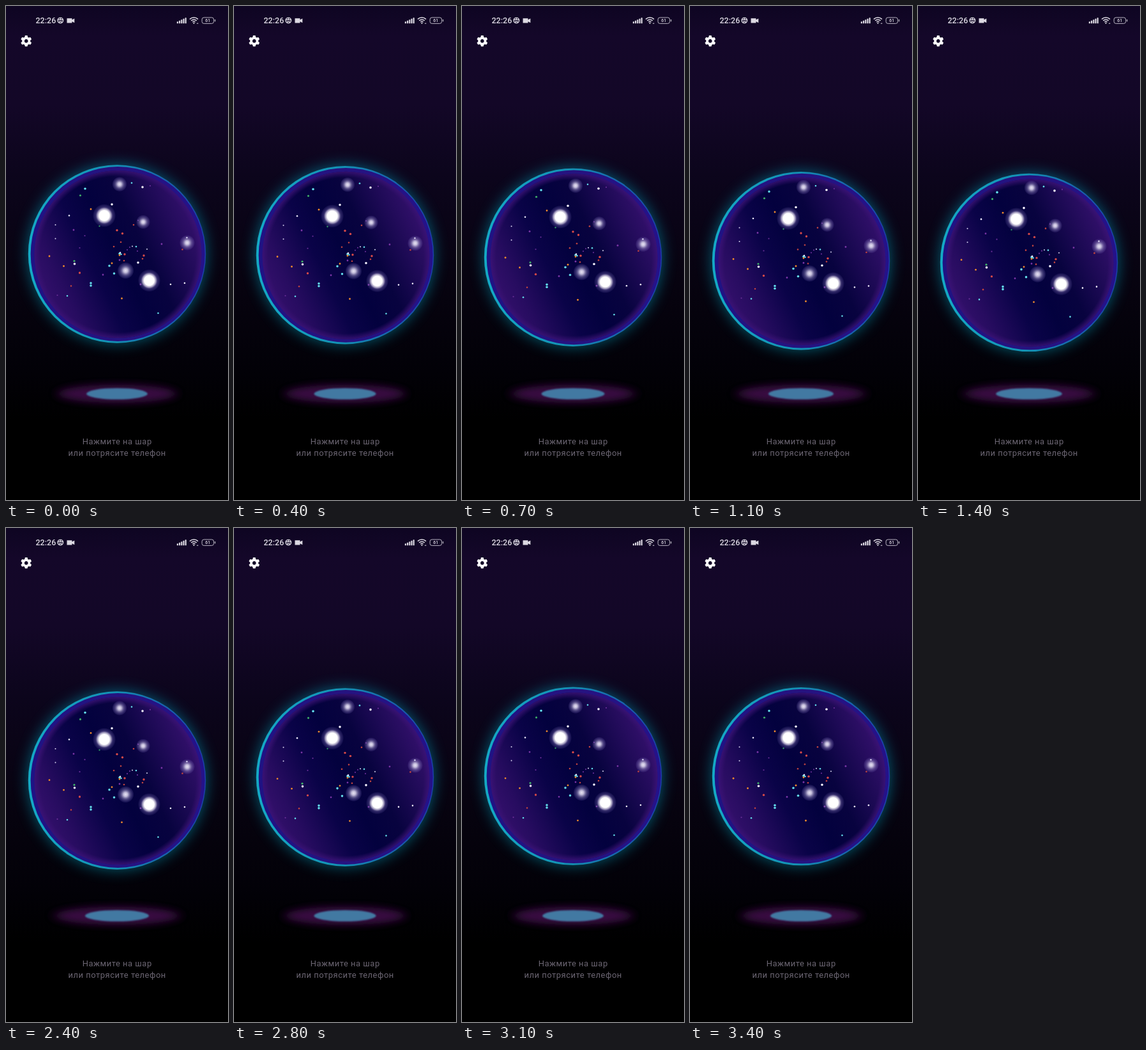
Write an HTML page that moves like this. It is 348 px wide and 772 px high and loops after 3500 ms.

```html
<!DOCTYPE html>
<html lang="ru">
<head>
<meta charset="utf-8">
<title>Шар</title>
<style>
  html, body { margin: 0; width: 100%; height: 100%; overflow: hidden; background: #000; }
  svg { display: block; width: 100%; height: 100%; }
  text { font-family: Roboto, "Noto Sans", sans-serif; }
  .hint { font-size: 13px; letter-spacing: .5px; fill: #6c6673; text-anchor: middle; }
  .clock { font-size: 12.5px; font-weight: 500; fill: #dcd9e2; }
  .charge { font-size: 7px; font-weight: 500; fill: #dcd9e2; text-anchor: middle; }
</style>
</head>
<body>
<svg viewBox="0 0 348 772">
  <defs>
    <linearGradient id="sky" x2="0" y2="1">
      <stop offset="0" stop-color="#0e0522"/>
      <stop offset=".06" stop-color="#140729"/>
      <stop offset=".2" stop-color="#130727"/>
      <stop offset=".34" stop-color="#0c051c"/>
      <stop offset=".55" stop-color="#070310"/>
      <stop offset=".74" stop-color="#020107"/>
      <stop offset=".84" stop-color="#000"/>
    </linearGradient>
    <linearGradient id="rim">
      <stop offset="0" stop-color="#14aac6"/>
      <stop offset=".5" stop-color="#1391b4"/>
      <stop offset=".8" stop-color="#1761b0"/>
      <stop offset="1" stop-color="#1a3fae"/>
    </linearGradient>
    <linearGradient id="band">
      <stop offset="0" stop-color="#1f1384"/>
      <stop offset=".5" stop-color="#261380"/>
      <stop offset="1" stop-color="#25128a"/>
    </linearGradient>
    <linearGradient id="core" gradientUnits="userSpaceOnUse" x1="-120" y1="58" x2="120" y2="-58">
      <stop offset="0" stop-color="#34106c"/>
      <stop offset=".13" stop-color="#270c60"/>
      <stop offset=".34" stop-color="#0a0348"/>
      <stop offset=".5" stop-color="#03013e"/>
      <stop offset=".66" stop-color="#08033f"/>
      <stop offset=".88" stop-color="#240c5c"/>
      <stop offset="1" stop-color="#33106c"/>
    </linearGradient>
    <radialGradient id="edge">
      <stop offset=".93" stop-color="#3a1270" stop-opacity="0"/>
      <stop offset="1" stop-color="#3a1278" stop-opacity=".85"/>
    </radialGradient>
    <radialGradient id="star">
      <stop offset="0" stop-color="#fff"/>
      <stop offset=".44" stop-color="#fff"/>
      <stop offset=".6" stop-color="#e4dcf2" stop-opacity=".7"/>
      <stop offset=".74" stop-color="#a08fd0" stop-opacity=".3"/>
      <stop offset=".94" stop-color="#8070c0" stop-opacity=".13"/>
      <stop offset="1" stop-color="#8070c0" stop-opacity="0"/>
    </radialGradient>
    <radialGradient id="dimStar">
      <stop offset="0" stop-color="#e8e4f4"/>
      <stop offset=".25" stop-color="#d6d0ea" stop-opacity=".9"/>
      <stop offset=".58" stop-color="#a79cd0" stop-opacity=".45"/>
      <stop offset=".92" stop-color="#8070c0" stop-opacity=".16"/>
      <stop offset="1" stop-color="#8070c0" stop-opacity="0"/>
    </radialGradient>
    <filter id="glow" x="-40%" y="-40%" width="180%" height="180%"><feGaussianBlur stdDeviation="11"/></filter>
    <filter id="haze" x="-40%" y="-150%" width="180%" height="400%"><feGaussianBlur stdDeviation="8 6"/></filter>
    <filter id="soft" x="-10%" y="-30%" width="120%" height="160%"><feGaussianBlur stdDeviation="1"/></filter>
  </defs>

  <rect width="348" height="772" fill="url(#sky)"/>

  <!-- status bar -->
  <text class="clock" x="46.5" y="27">22:26</text>
  <g fill="none" stroke="#dcd9e2" stroke-width="1.3">
    <circle cx="85.3" cy="22.6" r="4.3"/>
    <path d="M81 21.5h8.6M83 24.5h4.6M85.3 18.5v3M83.2 24.5v2M87.4 24.5v2"/>
  </g>
  <path d="M95.5 19.2h8v2.2l3.8-2v6.8l-3.8-2v2.2h-8z" fill="#dcd9e2"/>
  <g id="signal" fill="#dcd9e2"></g>
  <g fill="none" stroke="#dcd9e2" stroke-width="1.5">
    <path d="M288 20.6a9.3 9.3 0 0 1 13 0M290.2 23a6.2 6.2 0 0 1 8.6 0M292.4 25.2a3 3 0 0 1 4.2 0"/>
    <path d="M299 27.2h2.4" stroke-width="1"/>
  </g>
  <circle cx="294.5" cy="27" r="1.1" fill="#dcd9e2"/>
  <rect x="307.2" y="18" width="18.4" height="9.4" rx="3" fill="none" stroke="#b9b5c2"/>
  <path d="M327.6 21v3.4" stroke="#b9b5c2" stroke-width="1.3"/>
  <text class="charge" x="316.3" y="25.3">61</text>

  <!-- settings -->
  <g id="gear" transform="translate(31.7 54.7)" fill="#fff">
    <circle r="4.7" fill="none" stroke="#fff" stroke-width="3.6"/>
  </g>

  <!-- floor light -->
  <g transform="translate(174 606)">
    <ellipse id="floorHaze" rx="93" ry="14" fill="#40104a" opacity=".9" filter="url(#haze)"/>
    <ellipse id="floorSpot" rx="48" ry="8.8" fill="#4379a2" filter="url(#soft)"/>
  </g>

  <g id="ball">
    <circle r="140" fill="#108ca4" opacity=".62" filter="url(#glow)"/>
    <circle r="139.2" fill="url(#rim)"/>
    <ellipse cx="1.2" rx="136.6" ry="136.4" fill="url(#band)"/>
    <circle cx="1.5" cy=".5" r="131" fill="url(#core)"/>
    <circle cx="1.5" cy=".5" r="131" fill="url(#edge)"/>
  </g>
  <g id="stars"></g>

  <text class="hint" x="174.2" y="685">Нажмите на шар</text>
  <text class="hint" x="174.2" y="703">или потрясите телефон</text>
</svg>

<script>
const $ = id => document.getElementById(id);

function add(parent, tag, attrs) {
  const el = document.createElementNS("http://www.w3.org/2000/svg", tag);
  for (const key in attrs) el.setAttribute(key, attrs[key]);
  parent.append(el);
}

for (let i = 0; i < 5; i++) {
  const h = 3 + i * 1.5;
  add($("signal"), "rect", { x: 267.8 + i * 3.2, y: 27.3 - h, width: 2.2, height: h, rx: .6 });
}

for (let a = 0; a < 360; a += 60)
  add($("gear"), "path", { d: "M-2.6-5.2L-1.8-8.6H1.8L2.6-5.2z", transform: `rotate(${a})` });

// Dots by colour and radius: "x,y x,y ..."
const dots = [
  ["#63dcea", 1.8, "124,285.5 133,433 133,437 162,406 169.5,418 178,387"],
  ["#63dcea", 1.3, "197,276.5 238.5,480 96,453 204,376 180.5,388"],
  ["#3fae68", 1.6, "116.5,296 107,398.5"],
  ["#2f8f62", 1.2, "146.5,344"],
  ["#f6f4ff", 1.8, "214,283 166,310 107.5,403 207,401"],
  ["#f0ecff", 1.3, "283.5,362 280,433 258,435 99,327.5 179,385.5"],
  ["#d8d4f0", 1, "77.5,342 77.5,363.5 221,380 198,375.5"],
  ["#d84a48", 1.7, "174,350.5 182.5,355.5 115.5,417 216,390 186,388"],
  ["#c0443f", 1.3, "102,437.5 169,376 180,369 214,395 185,398 200,342 276.5,380.5"],
  ["#ef8a2c", 1.4, "68,391 90.5,406.5 133,317.5 181.5,457 166,402 178,389.5"],
  ["#7a35a6", 1.4, "106,350 152,420 244,372 211,435 178,397"],
  ["#6a2f98", 1.1, "115.5,378 123.5,359 80.5,452 226,281 207,335 190,381 206,383 194,377"]
];
for (const [fill, r, places] of dots)
  for (const place of places.split(" ")) {
    const [cx, cy] = place.split(",");
    add($("stars"), "circle", { cx, cy, r, fill });
  }

const bigStars = [
  [154, 327.5, 18, "star"], [224.5, 429, 17.5, "star"],
  [178, 278.5, 11.5, "dimStar"], [187.5, 413.5, 13, "dimStar"],
  [284, 370, 12, "dimStar"], [215, 337.5, 11, "dimStar"]
];
for (const [cx, cy, r, paint] of bigStars)
  add($("stars"), "circle", { cx, cy, r, fill: `url(#${paint})` });

const LOOP = 3500, STEP = 100, PERIOD = 3160, TOP = 387.5, SWING = 7;
const start = performance.now();

function draw() {
  const t = Math.floor((performance.now() - start) % LOOP / STEP) * STEP;
  const fall = 1 + Math.sin((t - 820) / PERIOD * 2 * Math.PI); // 0 high, 2 low
  const dy = fall * SWING;
  $("ball").setAttribute("transform", `translate(174 ${TOP + dy})`);
  $("stars").setAttribute("transform", `translate(0 ${dy * .42})`);
  $("floorHaze").setAttribute("transform", `scale(${1 + fall * .05} 1)`);
  $("floorSpot").setAttribute("transform", `scale(${1 + fall * .042} 1)`);
  requestAnimationFrame(draw);
}
draw();
</script>
</body>
</html>
```
